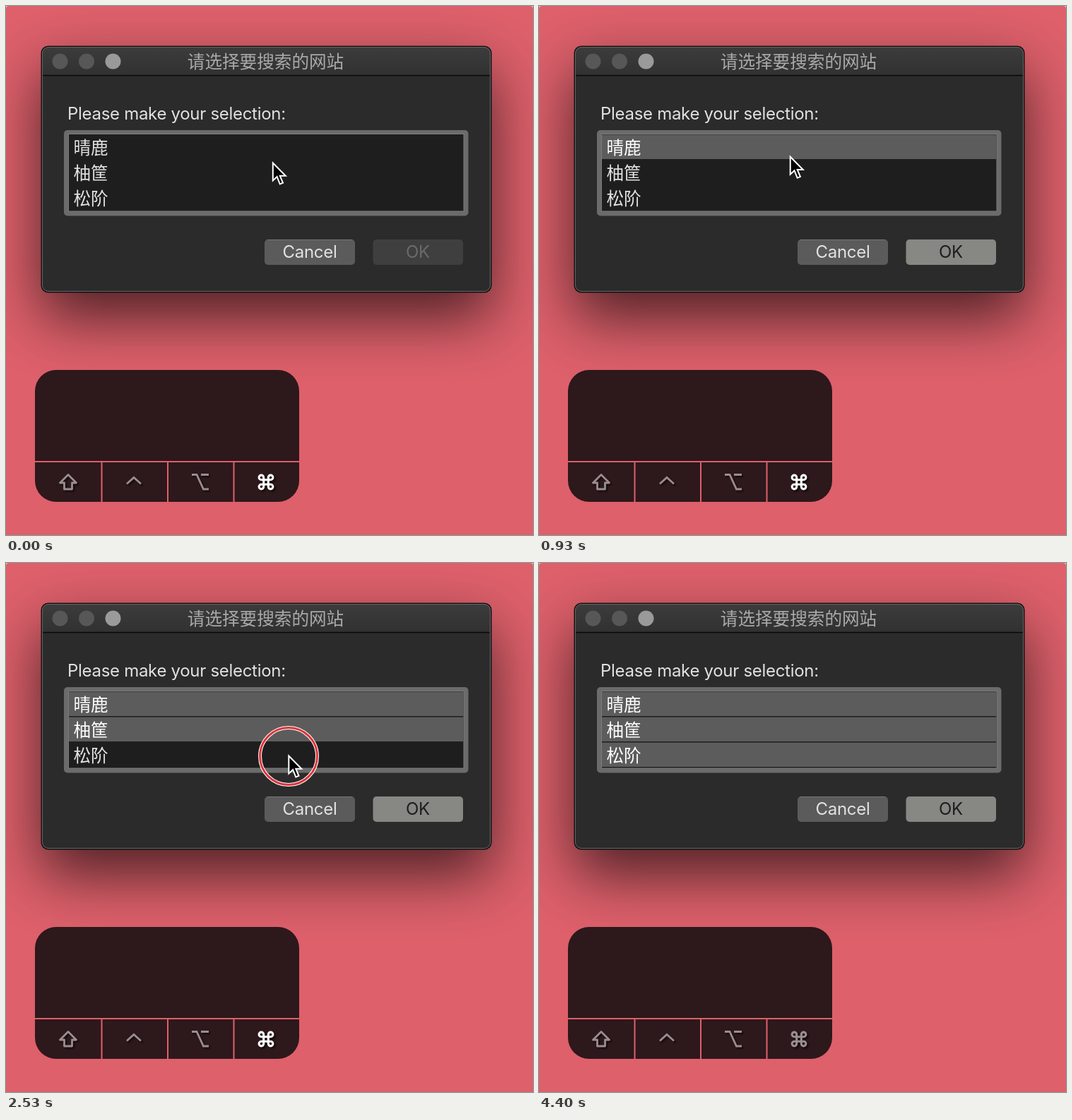
An HTML page for the animation above (4.47 s loop, 746 by 750 pixels).

```html
<!DOCTYPE html>
<html lang="zh-CN">
<head>
<meta charset="utf-8">
<style>
html, body { margin: 0; width: 100%; height: 100%; overflow: hidden; background: #f3c9cc; }
svg { display: block; width: 746px; height: 750px; }
text { font: 24px Inter, sans-serif; letter-spacing: -.3px; fill: #e2e2e2; }
.han { font: 24.6px "Noto Sans CJK SC", "Noto Sans CJK", sans-serif; letter-spacing: 0; }
.mid { text-anchor: middle; }
.key { fill: none; stroke: #9a8d8f; stroke-width: 2.8; filter: drop-shadow(2px 2px 1px #0009); }
</style>
</head>
<body>
<svg viewBox="0 0 746 750">
  <defs>
    <filter id="soft" filterUnits="userSpaceOnUse" x="-150" y="-150" width="1050" height="950">
      <feGaussianBlur stdDeviation="42"/>
    </filter>
    <linearGradient id="bar" x2="0" y2="1">
      <stop stop-color="#3c3c3c"/><stop offset="1" stop-color="#313131"/>
    </linearGradient>
    <clipPath id="panel"><rect x="41" y="516" width="374" height="187" rx="30"/></clipPath>
  </defs>
  <rect width="746" height="760" rx="4" fill="#dd606b"/>

  <!-- dialog -->
  <rect x="50" y="93" width="637" height="349" rx="10" opacity=".65" filter="url(#soft)"/>
  <rect x="49.5" y="56.5" width="638" height="350" rx="10" fill="#111"/>
  <rect x="51" y="58" width="635" height="347" rx="9" fill="#2b2b2b"/>
  <path d="M51 98V67a9 9 0 0 1 9-9H677a9 9 0 0 1 9 9V98z" fill="url(#bar)"/>
  <path d="M51 98.5H686" stroke="#080808" stroke-width="1.5"/>
  <rect x="51.5" y="58.5" width="634" height="346" rx="8.5" fill="none" stroke="#686868"/>
  <g fill="#575757">
    <circle cx="76.5" cy="78.5" r="11"/><circle cx="114" cy="78.5" r="11"/>
    <circle cx="151.5" cy="78.5" r="11" fill="#9a9a9a"/>
  </g>
  <text class="han mid" x="367.5" y="88" style="fill:#a9a9a9">请选择要搜索的网站</text>
  <text x="87" y="161">Please make your selection:</text>
  <rect x="82" y="176" width="572.5" height="121.5" rx="5" fill="#6b6b6b"/>
  <rect x="88.5" y="181.5" width="559.5" height="109.5" fill="#1e1e1e" stroke="#7c7c7c"/>
  <g id="list"></g>
  <rect x="366" y="331" width="128" height="36" rx="5" fill="#5b5b5b"/>
  <path d="M370 331.5H490" stroke="#777"/>
  <text class="mid" x="430" y="357">Cancel</text>
  <rect id="okBox" x="519.5" y="331" width="127.5" height="36" rx="5"/>
  <text id="okText" class="mid" x="583" y="357">OK</text>

  <!-- modifier keys -->
  <g clip-path="url(#panel)">
    <rect x="41" y="516" width="374" height="187" fill="#2d181b"/>
    <path d="M41 646H415M135.5 646V703M229 646V703M322.5 646V703" stroke="#dd606b" stroke-width="2"/>
  </g>
  <path class="key" d="M88 664.5L76.5 676H82.5V685H93.5V676H99.5z" stroke-linejoin="round"/>
  <path class="key" d="M171 677.5L181 668.5L191 677.5"/>
  <path class="key" d="M263 664.5H270L279.5 685H287M276 664.5H287"/>
  <path class="key" id="cmd" transform="translate(354.8 661.8) scale(1.1)"
    d="M15 6v12a3 3 0 1 0 3-3H6a3 3 0 1 0 3 3V6a3 3 0 1 0-3 3h12a3 3 0 1 0-3-3"/>

  <!-- pointer -->
  <g id="pointer">
    <g id="ring" fill="none">
      <circle cx=".5" cy="3" r="40.5" stroke="#fff" stroke-width="5"/>
      <circle cx=".5" cy="3" r="40.5" stroke="#dc353c" stroke-width="3"/>
    </g>
    <path d="M.8 2.5V27.5L6.6 22L10.8 32.5L15 30.8L10.8 20.8H18.8z" stroke="#fff" stroke-width="2"/>
  </g>
</svg>
<script>
const LOOP = 4470, STEP = 200 / 3;
const $ = id => document.getElementById(id);

// [time, x, y] of the pointer tip
const path = [
  [0, 377, 220], [500, 352, 208], [800, 352, 208], [1530, 385, 245], [1790, 386, 246],
  [2000, 396, 255], [2400, 399.5, 271], [3270, 399.5, 271], [3660, 420, 235],
  [3790, 420, 235], [4270, 480, -45]
];
const clicks = [[530, 670], [1600, 1740], [2460, 2670]];
const selectAt = [590, 1730, 2595];
const okAt = 670, releaseAt = 3060;

const rows = ['晴鹿', '柚筐', '松阶'].map((name, i) => {
  const y = 182.5 + i * 36;
  $('list').insertAdjacentHTML('beforeend',
    `<g><rect x="89" y="${y}" width="558.5" height="34.5" fill="#5c5c5c"/>
     <text class="han" x="95.5" y="${y + 27}">${name}</text></g>`);
  return $('list').lastElementChild;
});

function pointerAt(t) {
  const i = path.findIndex(p => p[0] > t);
  if (i < 0) return null;
  const [t0, x0, y0] = path[i - 1], [t1, x1, y1] = path[i];
  const u = (t - t0) / (t1 - t0), e = u * u * (3 - 2 * u);
  return [x0 + (x1 - x0) * e, y0 + (y1 - y0) * e];
}

const show = (el, on) => el.setAttribute('visibility', on ? 'inherit' : 'hidden');

function draw(now) {
  const t = Math.floor((now % LOOP + 4) / STEP) * STEP;
  const tip = pointerAt(t);
  show($('pointer'), tip);
  if (tip) $('pointer').setAttribute('transform', `translate(${tip})`);
  show($('ring'), clicks.some(([a, b]) => t >= a && t < b));
  rows.forEach((row, i) => {
    const on = t >= selectAt[i];
    show(row.firstElementChild, on);
    row.lastElementChild.style.fill = on ? '#fff' : '#e2e2e2';
  });
  const ready = t >= okAt - 5;
  $('okBox').style.fill = ready ? '#878784' : '#3f3f3f';
  $('okText').style.fill = ready ? '#1e1e1e' : '#6a6a6a';
  $('cmd').style.stroke = t < releaseAt ? '#fff' : '#9a8d8f';
}

let start;
function tick(now) {
  start ??= now;
  draw(now - start);
  requestAnimationFrame(tick);
}
draw(0);
requestAnimationFrame(tick);
</script>
</body>
</html>
```
